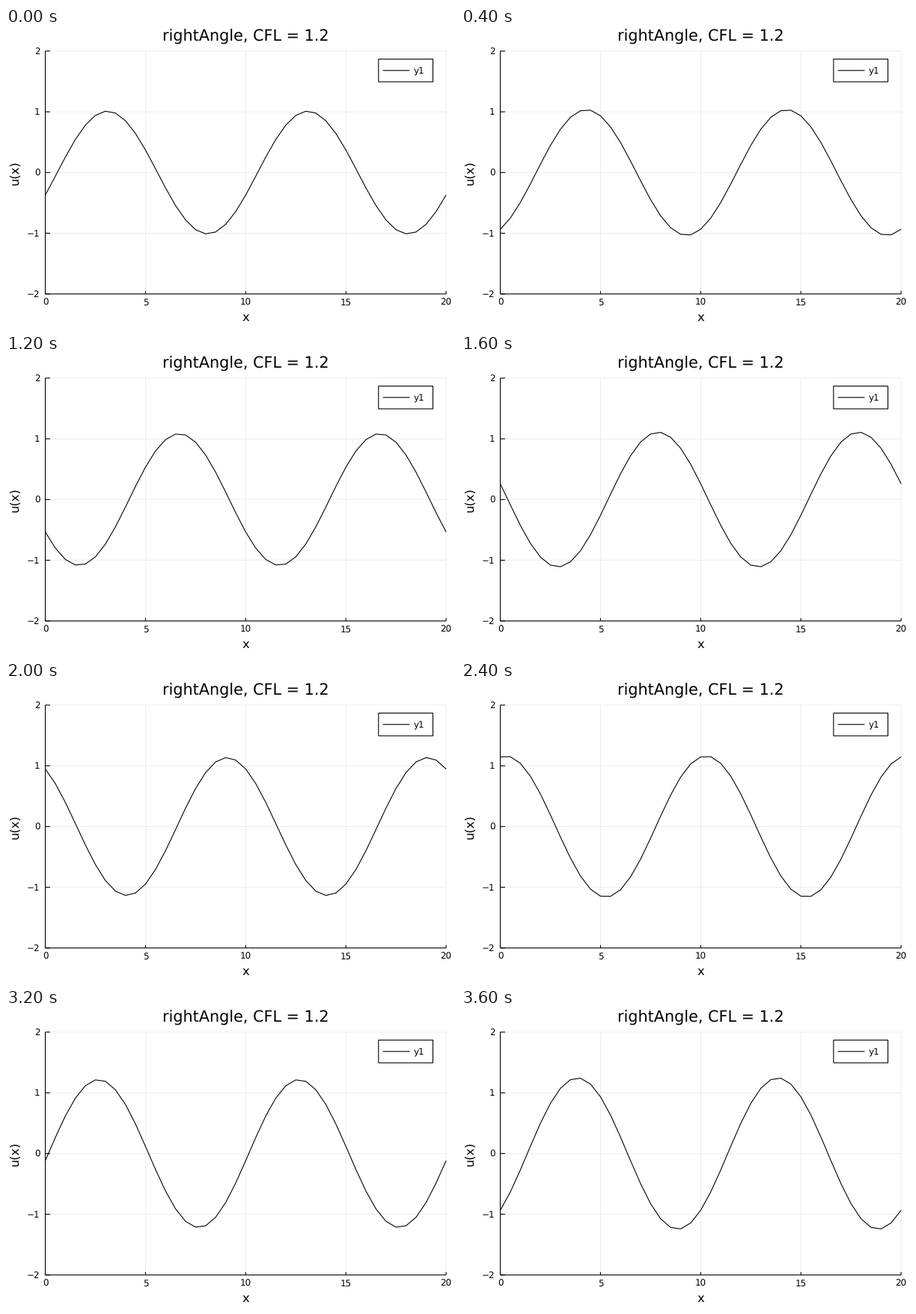
A matplotlib script that plays this animation: 600x400 px, repeating every 3.8 s.

```python
import numpy as np
import matplotlib.pyplot as plt
from matplotlib.animation import FuncAnimation
from matplotlib.patches import Rectangle

W, H, DPI = 600, 400, 100
FRAMES, INTERVAL = 19, 200
LEFT, RIGHT, TOP, BOTTOM = 52.5, 588.1, 30.9, 355.8
CFL, DX, WAVELENGTH = 1.2, 0.5, 10
PT = 72 / DPI
TICK = 0.012

plt.rcParams.update({
    "font.family": "DejaVu Sans",
    "text.hinting": "none",
    "toolbar": "None",
})

fig = plt.figure(figsize=(W / DPI, H / DPI), dpi=DPI, facecolor="white")
ax = fig.add_axes([0, 0, 1, 1])
ax.set(xlim=(0, W), ylim=(H, 0))
ax.axis("off")


def px(x):
    return LEFT + (RIGHT - LEFT) * x / 20


def py(u):
    return BOTTOM + (TOP - BOTTOM) * (u + 2) / 4


def line(xs, ys, width=1.1, **kw):
    return ax.plot(xs, ys, color="black", lw=width * PT, snap=False,
                   solid_capstyle="butt", **kw)[0]


def label(x, y, text, size, **kw):
    kw.setdefault("ha", "center")
    ax.text(x, y, text, fontsize=size * PT, va="baseline", color="black", **kw)


def draw_frame():
    xticks, yticks = range(0, 21, 5), range(-2, 3)
    for x in xticks:
        line([px(x)] * 2, [TOP, BOTTOM], 0.7, alpha=0.1)
    for u in yticks:
        line([LEFT, RIGHT], [py(u)] * 2, 0.7, alpha=0.1)

    line([LEFT, RIGHT], [BOTTOM] * 2)
    line([LEFT] * 2, [TOP, BOTTOM])
    for x in xticks:
        line([px(x)] * 2, [BOTTOM, BOTTOM - TICK * (BOTTOM - TOP)])
        label(px(x), 371, str(x), 11.9)
    for u in yticks:
        line([LEFT, LEFT + TICK * (RIGHT - LEFT)], [py(u)] * 2)
        label(45.3, py(u) + 4.3, str(u).replace("-", "\u2212"), 11.9,
              ha="right")

    label(px(10), 18, "rightAngle, CFL = 1.2", 20.8)
    label(px(10), 392, "x", 16.4)
    label(16.5, py(0), "u(x)", 16.4, rotation=90, rotation_mode="anchor")


def draw_legend():
    ax.add_patch(Rectangle((497.8, 41.6), 72.7, 30.4, facecolor="white",
                           edgecolor="black", lw=1.1 * PT, snap=False,
                           zorder=4))
    line([503.6, 539.4], [56.8] * 2, zorder=5)
    label(545, 61.2, "y1", 11.9, ha="left", zorder=5)


draw_frame()
draw_legend()

grid = np.arange(0, 20 + DX / 2, DX)
k = 2 * np.pi / WAVELENGTH
# growth per step of the upwind scheme for a single sine mode
gain = 1 - CFL + CFL * np.exp(-1j * k * DX)
curve = line(px(grid), py(0 * grid), zorder=3, solid_joinstyle="round")


def update(i):
    u = (gain ** (i + 1) * np.exp(1j * k * grid)).imag
    curve.set_ydata(py(u))
    return curve,


anim = FuncAnimation(fig, update, frames=FRAMES, interval=INTERVAL,
                     init_func=lambda: update(0), repeat=True, repeat_delay=0)
plt.show()
```
